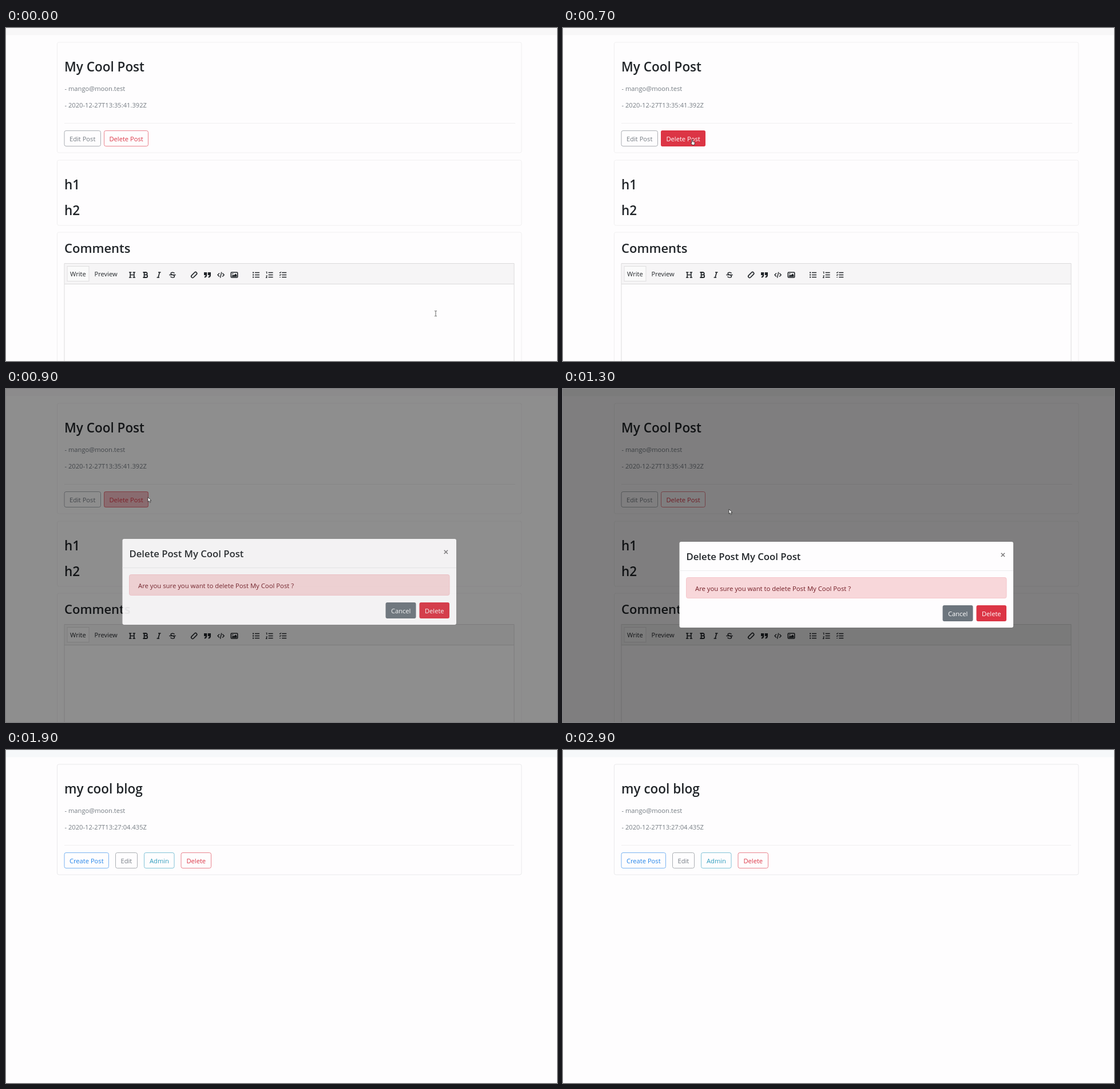
Animation, 963 px wide and 582 px high, one loop 3000 ms. Source, as an HTML page:

```html
<!DOCTYPE html>
<html lang="en">
<head>
<meta charset="utf-8">
<title>Delete post dialog</title>
<style>
html, body { margin: 0; width: 100%; height: 100%; overflow: hidden; background: #fefdfe; }
svg { display: block; width: 963px; height: 582px; font: 11.15px "Open Sans", "Noto Sans", sans-serif; }
.title { font-size: 22.5px; font-weight: 600; fill: #212529; }
.dialog-title { font-size: 16.7px; font-weight: 600; fill: #212529; }
.muted { fill: #757c83; }
.ink { fill: #212529; }
.light { fill: #fff; }
.card { fill: none; stroke: #f0eff0; }
.rule { stroke: #f0eff0; }
.blog .card { stroke: #e9e9eb; }
.btn rect { fill: none; stroke: currentColor; stroke-opacity: .6; }
.btn text { fill: currentColor; }
.gray { color: #757c83; }
.red { color: #dc3545; }
.blue { color: #2384ea; }
.teal { color: #2f9dbe; }
.icons { fill: none; stroke: #212529; stroke-width: 1.6; }
.icons .solid { fill: #212529; stroke: none; }

/* Every part holds its pose for a tenth of a second, so all steps are hard. */
.post, .blog, .backdrop, .dialog, .question, .loading, .hover-fill, .hover-text,
.confirm, .cursor, .beam, .arrow, .hand {
  animation: 3s step-end infinite;
}
.post { animation-name: post; }
.blog { animation-name: blog; }
.backdrop { animation-name: backdrop; }
.dialog { animation-name: dialog; }
.question { animation-name: question; }
.loading { animation-name: loading; }
.hover-fill { animation-name: hover-fill; }
.hover-text { animation-name: hover-text; }
.confirm { animation-name: confirm; }
.cursor { animation-name: cursor; }
.beam { animation-name: beam; }
.arrow { animation-name: arrow; }
.hand { animation-name: hand; }

@keyframes post { 0% { opacity: 1 } 63.33%, 100% { opacity: 0 } }
@keyframes blog { 0% { opacity: 0 } 63.33%, 100% { opacity: 1 } }
@keyframes backdrop {
  0% { opacity: 0 }
  26.66% { opacity: .16 }
  30% { opacity: .44 }
  33.33%, 100% { opacity: .5 }
}
@keyframes dialog {
  0% { opacity: 0; transform: translateY(-36px) }
  26.66% { opacity: .33; transform: translateY(-18px) }
  30% { opacity: .9; transform: translateY(-5px) }
  33.33%, 100% { opacity: 1; transform: none }
}
@keyframes question { 0% { opacity: 1 } 60%, 100% { opacity: 0 } }
@keyframes loading { 0% { opacity: 0 } 60%, 100% { opacity: 1 } }
@keyframes hover-fill {
  0% { opacity: 0 }
  16.66% { opacity: .7 }
  20% { opacity: 1 }
  30% { opacity: .3 }
  33.33%, 100% { opacity: 0 }
}
@keyframes hover-text {
  0% { fill: #dc3545 }
  16.66% { fill: #fff }
  30%, 100% { fill: #dc3545 }
}
@keyframes confirm { 0% { fill: #dc3545 } 53.33%, 100% { fill: #c82333 } }
@keyframes cursor {
  0% { transform: translate(751px, 499px) }
  3.33% { transform: translate(735px, 486px) }
  6.66% { transform: translate(640px, 420px) }
  10% { transform: translate(480px, 320px) }
  13.33% { transform: translate(330px, 245px) }
  16.66% { transform: translate(240px, 205px) }
  20% { transform: translate(226px, 196px) }
  23.33% { transform: translate(224px, 195px) }
  30% { transform: translate(248px, 189px) }
  36.66% { transform: translate(250px, 191px) }
  40% { transform: translate(252px, 192px) }
  43.33% { transform: translate(290px, 210px) }
  46.66% { transform: translate(420px, 262px) }
  50% { transform: translate(590px, 330px) }
  53.33% { transform: translate(735px, 388px) }
  56.66% { transform: translate(743px, 397px) }
  60%, 100% { transform: translate(743px, 408.5px) }
}
@keyframes beam { 0% { opacity: 1 } 6.66%, 100% { opacity: 0 } }
@keyframes arrow {
  0% { opacity: 0 }
  6.66% { opacity: 1 }
  16.66% { opacity: 0 }
  30% { opacity: 1 }
  53.33% { opacity: 0 }
  60%, 100% { opacity: 1 }
}
@keyframes hand {
  0% { opacity: 0 }
  16.66% { opacity: 1 }
  30% { opacity: 0 }
  53.33% { opacity: 1 }
  60%, 100% { opacity: 0 }
}
</style>
</head>
<body>
<svg viewBox="0 0 963 582">
  <rect width="963" height="582" fill="#fefdfe"/>

  <g class="post">
    <rect width="963" height="12.5" fill="#f8f7f8"/>

    <rect class="card" x="89.5" y="25" width="811.5" height="193" rx="3"/>
    <text class="title" x="102" y="76">My Cool Post</text>
    <text class="muted" x="102.5" y="110">- mango@moon.test</text>
    <text class="muted" x="102.5" y="139">- 2020-12-27T13:35:41.392Z</text>
    <path class="rule" d="M102 166.5H890"/>
    <g class="btn gray">
      <rect x="102" y="179.5" width="63.5" height="27" rx="3"/>
      <text x="111" y="197.5">Edit Post</text>
    </g>
    <g class="btn red">
      <rect x="171.5" y="179.5" width="77" height="27" rx="3"/>
    </g>
    <rect class="hover-fill" x="171" y="179" width="78" height="28" rx="3" fill="#dc3545"/>
    <text class="hover-text" x="180.5" y="197.5">Delete Post</text>

    <rect class="card" x="89.5" y="231" width="811.5" height="114" rx="3"/>
    <text class="title" x="102" y="281.5">h1</text>
    <text class="title" x="102" y="326.5">h2</text>

    <rect class="card" x="89.5" y="357" width="811.5" height="300" rx="3"/>
    <text class="title" x="102" y="393" style="font-size:22px">Comments</text>
    <rect x="102" y="411.5" width="786" height="36" fill="#f6f5f6"/>
    <path d="M102 590V411.5H888V590M102 447.5H888" fill="none" stroke="#dcdbdc"/>
    <rect x="107" y="416.5" width="38" height="26" fill="#fafafa" stroke="#dfdedf"/>
    <text class="ink" x="112" y="434">Write</text>
    <text class="ink" x="154.5" y="434">Preview</text>

    <g class="icons">
      <path d="M215 427h4.4M221.6 427h4.4M215 436h4.4M221.6 436h4.4M217.2 427v9M223.8 427v9M217.2 431.5h6.6"/>
      <path d="M239.5 427h5a2.2 2.2 0 0 1 0 4.4h-3h3.4a2.3 2.3 0 0 1 0 4.6h-5.4M241.6 427v9" stroke-width="1.8"/>
      <path d="M266 427h4.5M263.6 436h4.5M268.5 427l-2.5 9"/>
      <path d="M294.5 428.6c-1-1.8-6.4-2-6.4.6 0 2.6 6.4 1.8 6.4 4.8 0 2.8-5.6 2.6-7 .4M285.3 431.5h11.4" stroke-width="1.4"/>
      <g transform="translate(328.7 431.5) rotate(-45)">
        <path d="M1.4-2.4H-3.6a2.4 2.4 0 0 0 0 4.8h2.2M-1.4 2.4H3.6a2.4 2.4 0 0 0 0-4.8h-2.2"/>
      </g>
      <path class="solid" d="M346 427h5.2v5q-.2 4.4-4.4 4.4v-2q2-.2 2-2.4h-2.8zM352.8 427h5.2v5q-.2 4.4-4.4 4.4v-2q2-.2 2-2.4h-2.8z"/>
      <path d="M373 428.6l-3 3 3 3M378.2 428.6l3 3-3 3M376.7 426.6l-2.2 10" stroke-width="1.4"/>
      <rect x="393.3" y="427" width="11.4" height="9" rx="1"/>
      <path class="solid" d="M394.8 434.8v-1.8l2-2 1.4 1.3 3-3 2.2 2.4v3.1z"/>
      <circle class="solid" cx="396.3" cy="429.4" r="1"/>
      <path d="M435 427.5h8M435 431.5h8M435 435.5h8M458.6 427.5h8M458.6 431.5h8M458.6 435.5h8M482.2 427.5h8M482.2 431.5h8M482.2 435.5h8" stroke-width="1.4"/>
      <path d="M431 427.5h2.2M431 431.5h2.2M431 435.5h2.2" stroke-width="2.1"/>
      <path d="M454.6 426.4h1.2v3.2M454.4 433h1.8l-1.6 3.4h2M478 427.2l1 1 1.8-2M478 431.4l1 1 1.8-2M478.2 435.5h1.8" stroke-width="1.1"/>
    </g>

    <rect class="backdrop" width="963" height="582"/>

    <g class="dialog">
      <g class="question">
        <rect x="203.5" y="267" width="583.5" height="150" rx="3" fill="#fefdfe"/>
        <path d="M765.8 286.8l6.2 6.2M772 286.8l-6.2 6.2" stroke="#7c7b7c" stroke-width="1.6"/>
        <rect x="215.5" y="329.5" width="559.5" height="36" rx="3" fill="#f8d7da" stroke="#f5c6cb"/>
        <text x="231" y="352.5" fill="#721c24" style="font-size:11.3px">Are you sure you want to delete Post My Cool Post ?</text>
        <rect x="663.5" y="378" width="53" height="28" rx="3" fill="#6c757d"/>
        <text class="light" x="673" y="396.5">Cancel</text>
        <rect class="confirm" x="722.5" y="378" width="52.5" height="28" rx="3" fill="#dc3545"/>
        <text class="light" x="732" y="396.5">Delete</text>
      </g>
      <g class="loading">
        <rect x="203.5" y="267" width="583.5" height="167.5" rx="3" fill="#fefdfe"/>
        <path d="M502.35 368.65a10.4 10.4 0 1 0 0 14.7" fill="none" stroke="#212529" stroke-width="2.7"/>
      </g>
      <text class="dialog-title" x="215.5" y="299">Delete Post My Cool Post</text>
      <path d="M203.5 317.5H787" stroke="#ececee"/>
    </g>

    <g class="cursor">
      <path class="beam" d="M-2-4.5h1.5l.5.5.5-.5H2M0-4v8M-2 4.5h1.5l.5-.5.5.5H2" fill="none" stroke="#555" stroke-width=".9"/>
      <path class="arrow" d="M0 0v8.2l1.9-1.7 1.4 3.2 1.5-.7-1.4-3h2.5z" fill="#fff" stroke="#222" stroke-width=".8"/>
      <path class="hand" d="M1 0q1-.6 1.5.5v3l3 .8q1 .4.8 1.6l-.6 3.4H1.8L-.4 6q-.2-1 1.4-.4z" fill="#fff" stroke="#222" stroke-width=".8"/>
    </g>
  </g>

  <g class="blog">
    <rect width="963" height="582" fill="#fefdfe"/>
    <rect width="963" height="12.5" fill="#f6f8fa"/>
    <rect class="card" x="89.5" y="25" width="811.5" height="193" rx="3"/>
    <text class="title" x="102" y="76">my cool blog</text>
    <text class="muted" x="102.5" y="110">- mango@moon.test</text>
    <text class="muted" x="102.5" y="139">- 2020-12-27T13:27:04.435Z</text>
    <path class="rule" d="M102 166.5H888"/>
    <g class="btn blue">
      <rect x="102" y="179.5" width="77.5" height="27" rx="3"/>
      <text x="111" y="197.5">Create Post</text>
    </g>
    <g class="btn gray">
      <rect x="191.5" y="179.5" width="38" height="27" rx="3"/>
      <text x="200.5" y="197.5">Edit</text>
    </g>
    <g class="btn teal">
      <rect x="241.5" y="179.5" width="52.5" height="27" rx="3"/>
      <text x="251" y="197.5">Admin</text>
    </g>
    <g class="btn red">
      <rect x="306" y="179.5" width="52.5" height="27" rx="3"/>
      <text x="315.5" y="197.5">Delete</text>
    </g>
  </g>
</svg>
</body>
</html>
```
